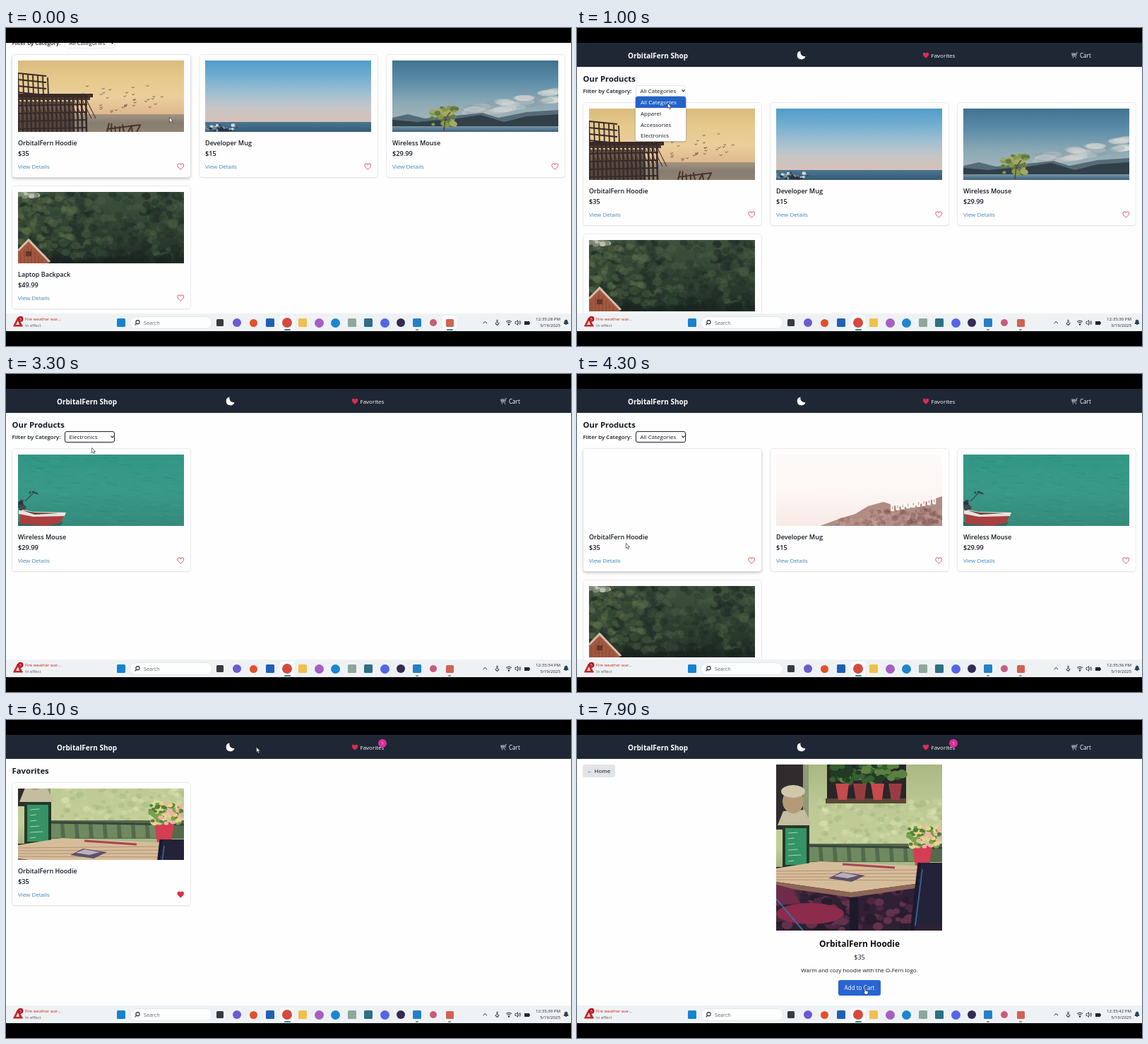
Recreate the animation shown at these times as an HTML page with a canvas. Size 800 by 450 pixels, loop 8000 ms.

```html
<!DOCTYPE html>
<html lang="en">
<head>
<meta charset="utf-8">
<title>Shop demo</title>
<style>
html, body { margin: 0; width: 100%; height: 100%; overflow: hidden; background: #000; }
body { font-family: 'Open Sans', 'Noto Sans', sans-serif; }
div, svg, canvas { position: absolute; }
svg { overflow: visible; }
.t { line-height: 20px; white-space: nowrap; }
#stage { left: 0; top: 0; width: 800px; height: 450px; overflow: hidden; background: #000; }
#view { top: 21px; width: 800px; height: 383px; overflow: hidden; background: #fefefe; }
#doc { top: -21px; width: 800px; height: 600px; }
#head { top: 21px; width: 800px; height: 33.5px; background: #1f2735; }
.card { width: 252.5px; height: 172.5px; border-radius: 4px; background: #fefefe;
  box-shadow: 0 0 0 .7px #e3e5e8, 0 1px 2px #0002; }
.card.hover { box-shadow: 0 0 0 .7px #dfe1e5, 0 2px 4px #0004; }
#select { left: 83px; top: 80.5px; width: 71px; height: 16.5px; box-sizing: border-box;
  border: .7px solid #e8e9ec; border-radius: 3px; background: #fefefe; }
#select.ring { border: 1.5px solid #1c2027; }
#menu { left: 83px; top: 97px; width: 71px; height: 62.5px; border-radius: 3px; background: #fefefe;
  box-shadow: 0 0 0 .7px #b9bdc4, 0 1px 3px #0004; overflow: hidden; }
.row { width: 71px; height: 15.6px; }
.row.on { background: #2463c8; }
.row.on .t { color: #fff !important; }
#link { top: 393px; height: 11px; background: #cfe1ea; border-radius: 0 2px 0 0; }
#bar { top: 404px; width: 800px; height: 25px; background: #eef2f4; }
</style>
</head>
<body>
<div id="stage"></div>
<script>
const LOOP = 8000, FRAME = 100, INK = '#151a26';
const HEART = 'M12 21C5 15.500 2 12 2 8a5 5 0 0 1 10-2 5 5 0 0 1 10 2c0 4-3 7.500-10 13z';

// ---------- element helpers ----------
function box(parent, props = {}, style = {}) {
  const el = Object.assign(document.createElement('div'), props);
  for (const k in style) el.style[k] = typeof style[k] === 'number' ? style[k] + 'px' : style[k];
  parent.append(el);
  return el;
}
// x is the left edge, or the centre/right edge when align says so; y is the middle of the capitals
function text(parent, str, x, y, size, color = INK, weight = 400, align = 0) {
  return box(parent, { className: 't', textContent: str }, {
    left: x, top: y - 10, fontSize: size, color, fontWeight: String(weight),
    transform: `translateX(${-align * 100}%)`
  });
}
function icon(parent, x, y, w, h, viewBox, body) {
  const holder = box(parent, {}, { left: x, top: y });
  holder.innerHTML = `<svg width="${w}" height="${h}" viewBox="${viewBox}">${body}</svg>`;
  return holder;
}
function canvas(parent, x, y, w, h) {
  const el = Object.assign(document.createElement('canvas'), { width: w, height: h });
  el.style.left = x + 'px';
  el.style.top = y + 'px';
  parent.append(el);
  return el;
}
const show = (el, on) => { el.style.display = on ? '' : 'none'; };

// ---------- photos ----------
function brush(c, seed) {
  const rnd = () => (seed = (seed * 16807) % 2147483647) / 2147483647;
  return {
    rnd,
    sky(y, h, ...stops) {
      const g = c.createLinearGradient(0, y, 0, y + h);
      stops.forEach((s, i) => g.addColorStop(i / (stops.length - 1), s));
      c.fillStyle = g;
      c.fillRect(0, y, 235, h);
    },
    rect(color, x, y, w, h) { c.fillStyle = color; c.fillRect(x, y, w, h); },
    poly(color, ...p) {
      c.fillStyle = color;
      c.beginPath();
      for (let i = 0; i < p.length; i += 2) c.lineTo(p[i], p[i + 1]);
      c.fill();
    },
    line(color, width, ...p) {
      c.strokeStyle = color;
      c.lineWidth = width;
      c.beginPath();
      for (let i = 0; i < p.length; i += 2) c.lineTo(p[i], p[i + 1]);
      c.stroke();
    },
    oval(color, x, y, rx, ry = rx) {
      c.fillStyle = color;
      c.beginPath();
      c.ellipse(x, y, rx, ry, 0, 0, 7);
      c.fill();
    },
    dabs(n, x, y, w, h, r, ...colors) {
      for (let i = 0; i < n; i++) {
        const s = r * (.4 + rnd() * .6);
        this.oval(colors[i % colors.length], x + rnd() * w, y + rnd() * h, s, s * .8);
      }
    }
  };
}

const paint = {
  pier(b) {
    b.sky(0, 77, '#d9bb7c', '#e6c98c', '#ebcf9b', '#dfb78f');
    b.sky(76, 25, '#a3947f', '#857d72', '#928370');
    const dark = '#372a29';
    for (let x = 0; x < 44; x += 7) b.line(dark, 1.8, x, 17 + x / 6, x + 1, 50);
    for (let y = 18; y < 48; y += 9) b.line(dark, 2, 0, y, 40, y + 4);
    b.rect(dark, 0, 47, 106, 5);
    b.rect('#4b3933', 0, 52, 102, 4);
    for (let x = 0; x < 102; x += 6) {
      b.line(dark, 2.6, x, 50, x + 1, 101);
      b.line('#463630', 1.1, x, 54, x + 14, 82);
    }
    b.rect('#3a2d2bb0', 0, 58, 78, 43);
    for (let y = 64; y < 101; y += 11) b.line(dark, 2, 0, y, 98, y - 2);
    for (let i = 0; i < 34; i++) {
      const x = 92 + b.rnd() * 112, y = 34 + b.rnd() * 40;
      b.line('#655444', .9, x - 2, y - 1, x, y, x + 2, y - 1.5);
    }
    for (let x = 126; x < 174; x += 6) b.line('#4a332c', 2, x, 101, x + 6 - b.rnd() * 10, 87 + b.rnd() * 6);
    b.line('#4a332c', 2, 126, 97, 174, 91);
  },
  sea(b) {
    b.sky(0, 88, '#519dcb', '#72adcf', '#9bbfd1', '#c5c6c7', '#d8c1b7');
    b.sky(87, 14, '#4a7590', '#365b76');
    b.dabs(26, 0, 91, 46, 8, 3, '#cfd8dc', '#71889a', '#303d4b');
    b.dabs(12, 6, 96, 34, 5, 3, '#2b3440');
  },
  lake(b) {
    b.sky(0, 90, '#41738f', '#5d8da8', '#8caab5', '#a7b6b9');
    for (let i = 0; i < 44; i++) {
      const u = b.rnd();
      b.oval(['#c9cfd060', '#e0dfda70', '#8b9ca460'][i % 3], 110 + u * 125, 67 - u * 25 + b.rnd() * 14, 14, 4);
    }
    b.poly('#566b78', 0, 81, 22, 76, 46, 82, 90, 78, 128, 74, 150, 81, 190, 73, 235, 70, 235, 96, 0, 96);
    b.poly('#303f48', 0, 84, 35, 87, 92, 82, 125, 77, 158, 87, 190, 79, 235, 76, 235, 95, 0, 95);
    b.sky(93, 8, '#7895a5', '#3e617e');
    b.line('#55513c', 2, 73, 98, 75, 76);
    b.dabs(54, 55, 66, 36, 26, 5, '#87984b', '#617943', '#a3ab61');
    b.line('#55513c', 1.5, 73, 101, 75, 82, 82, 73);
  },
  trees(b) {
    b.sky(0, 101, '#3f5140', '#304232', '#202c25');
    b.dabs(420, 0, 0, 235, 92, 8, '#38503970', '#4c604470', '#26372b80', '#1f2c2590');
    b.dabs(90, 0, 10, 82, 66, 7, '#5b6c4860', '#6f7b5050', '#314431a0');
    b.dabs(24, 0, 0, 32, 6, 5, '#b9bfb0', '#7e8b72');
    b.dabs(26, 40, 88, 195, 13, 12, '#1b241f90');
    b.poly('#a2583f', 0, 83, 15, 68, 43, 98, 43, 101, 0, 101);
    for (let x = 4; x < 38; x += 5) b.line('#82432f', .8, x, 101, x, 76 + Math.abs(x - 15));
    b.line('#d8bca9', 3, 0, 83, 15, 68, 45, 99);
    b.rect('#61372d', 11, 84, 8, 7);
  },
  hill(b) {
    b.sky(0, 101, '#fcfaf9', '#fcf7f5', '#f8ebe7');
    b.poly('#b18c85', 62, 101, 92, 90, 112, 84, 130, 73, 152, 67, 170, 73, 192, 75, 214, 66, 235, 59, 235, 101);
    b.dabs(140, 128, 78, 107, 22, 5, '#9b706a80', '#76524f70', '#c39c9280');
    b.dabs(36, 82, 90, 60, 10, 4, '#9b706a80', '#c6a29a80');
    for (let i = 0; i < 9; i++) {
      b.rect('#fbf6f2', 162 + i * 7.4, 70 - i * 1.2, 5, 10);
      b.rect('#c3a09a', 164 + i * 7.4, 73 - i * 1.2, 1.2, 4);
    }
  },
  boat(b) {
    b.sky(0, 101, '#329684', '#399987', '#348a7b');
    for (let i = 0; i < 210; i++) {
      const x = b.rnd() * 235, y = b.rnd() * 101;
      b.line(['#58ab9738', '#20796b45'][i % 2], 1, x, y, x + 6 + b.rnd() * 10, y + 1);
    }
    b.poly('#246b62', 0, 95, 64, 95, 60, 101, 0, 101);
    b.poly('#a9403f', 2, 80, 20, 84, 67, 84, 60, 97, 40, 101, 3, 98);
    b.poly('#ece3dc', 1, 77, 22, 81, 68, 82, 66, 87, 22, 88, 1, 84);
    b.poly('#67453f', 6, 79, 24, 82, 58, 83, 24, 85);
    b.dabs(14, 0, 65, 9, 12, 4, '#28383c', '#414a4c');
    b.line('#34494a', 1.2, 10, 66, 22, 54, 29, 56);
    b.dabs(7, 16, 51, 14, 6, 2, '#34494a');
  },
  cafe(b) {
    b.sky(0, 235, '#a9b883', '#bdc994', '#c3cd98', '#82976f', '#322637');
    b.dabs(160, 60, 48, 175, 65, 6, '#dce3b470', '#9eb17d60', '#c8d69d60');
    b.rect('#302b2d', 0, 0, 42, 92);
    b.rect('#8c9a76', 38, 0, 8, 112);
    b.rect('#292528', 72, 0, 112, 51);
    b.rect('#5a4636', 70, 48, 114, 7);
    b.dabs(80, 72, 0, 108, 25, 8, '#365f2e', '#5b8141', '#203b25');
    for (let i = 0; i < 4; i++) b.poly(i % 2 ? '#973d42' : '#c74a4d',
      84 + i * 25, 27, 103 + i * 25, 27, 100 + i * 25, 50, 88 + i * 25, 50);
    b.poly('#c4bda0', 2, 86, 10, 66, 40, 64, 51, 86);
    b.oval('#b59a78', 24, 52, 15, 17);
    b.oval('#d0c8aa', 24, 38, 17, 9);
    b.rect('#546a4b', 42, 112, 193, 26);
    for (let x = 45; x < 188; x += 20) b.poly('#6f8961', x, 115, x + 15, 116, x + 16, 137, x + 2, 137);
    b.line('#36463b', 3, 42, 115, 235, 118);
    b.rect('#302034', 0, 145, 235, 90);
    b.dabs(90, 0, 178, 190, 56, 9, '#4b2840', '#271d2d', '#63314a');
    b.rect('#263828', 9, 86, 38, 60);
    b.rect('#359366', 13, 90, 30, 52);
    for (let y = 97; y < 140; y += 8) b.line('#a7d8a7', 1.2, 17, y, 25 + b.rnd() * 13, y - 1);
    b.poly('#d6bd99', 0, 147, 62, 137, 232, 145, 204, 168, 106, 181, 0, 166);
    b.poly('#8c6557', 0, 166, 106, 181, 204, 168, 204, 174, 106, 188, 0, 173);
    for (let i = 0; i < 4; i++) b.line('#b48f76', 1, 0, 151 + i * 4, 210, 149 + i * 5);
    b.poly('#5d506a', 74, 161, 92, 152, 126, 157, 107, 166);
    b.poly('#b9b0bb', 82, 158, 94, 153, 116, 157, 101, 161);
    b.line('#a64553', 3, 94, 141, 168, 146);
    b.poly('#d43e52', 193, 116, 221, 116, 217, 143, 197, 143);
    b.dabs(100, 187, 88, 44, 28, 5, '#78a34b', '#e6d58a', '#4d813c', '#ecb5a2');
    b.oval('#8c2b4c', 48, 211, 48, 15);
    b.poly('#6e2c48', 0, 170, 24, 176, 34, 196, 0, 200);
    b.poly('#242239', 205, 139, 235, 139, 235, 228, 196, 228);
    b.line('#191a30', 5, 203, 139, 192, 235);
    b.line('#3978a8', 1.4, 207, 148, 197, 228);
    b.line('#386e9b', 2, 0, 190, 38, 235);
    b.rect('#1d192a', 104, 188, 12, 47);
  }
};
const photos = {};
Object.keys(paint).forEach((name, i) => {
  const pic = Object.assign(document.createElement('canvas'), { width: 235, height: name === 'cafe' ? 235 : 101 });
  paint[name](brush(pic.getContext('2d'), 71 + i * 913));
  photos[name] = pic;
});
function hang(target, name) {
  if (target.dataset.name === name) return;
  target.dataset.name = name;
  const c = target.getContext('2d'), pic = photos[name];
  c.clearRect(0, 0, 235, 235);
  if (pic) c.drawImage(pic, 0, Math.round((target.height - pic.height) / 2));
}

// ---------- page ----------
const stage = document.getElementById('stage');
const view = box(stage, { id: 'view' });
const doc = box(view, { id: 'doc' });
const head = box(doc, { id: 'head' });
text(head, 'OrbitalFern Shop', 72, 17.5, 10, '#fff', 700);
icon(head, 312, 11, 12, 12, '0 0 12 12', '<path d="M4.500 .5A6 6 0 1 0 11.500 8 6 6 0 0 1 4.500 .5z" fill="#fff"/>');
icon(head, 488.5, 12.5, 10, 10, '0 0 24 24', `<path d="${HEART}" fill="#df2b53"/>`);
text(head, 'Favorites', 501.5, 17.5, 8, '#fff');
icon(head, 700, 13, 9, 9, '0 0 9 9',
  '<path d="M9 .5H7.800L6.500 6H1.500L.5 2H7M1 3.500H7M2.500 2V6M4.500 2V6" fill="none" stroke="#b9c0c6" stroke-width=".8"/><path d="M2 8h1M6 8h1" stroke="#b9c0c6" stroke-width="1.400"/>');
text(head, 'Cart', 712, 17.5, 8.1, '#fff');
const badge = box(head, {}, { left: 527, top: 6, width: 12, height: 12, borderRadius: 6, background: '#d92f98' });
text(badge, '1', 6, 6, 6, '#fff', 400, .5);

const heading = text(doc, '', 8.5, 72, 11.3, INK, 700);
const filter = box(doc);
text(filter, 'Filter by Category:', 8.5, 89, 7.9, INK, 600);
const select = box(filter, { id: 'select' });
const chosen = text(filter, '', 89.5, 89, 8);
icon(filter, 147.5, 87, 5, 4, '0 0 5 4', '<path d="M.5 .5 2.500 2.800 4.500 .5" fill="none" stroke="#151a26" stroke-width="1.100"/>');

const products = [['OrbitalFern Hoodie', '$35'], ['Developer Mug', '$15'], ['Wireless Mouse', '$29.99'], ['Laptop Backpack', '$49.99']];
const cards = products.map(([name, price]) => {
  const el = box(doc, { className: 'card' });
  const photo = canvas(el, 8.5, 8, 235, 101);
  text(el, name, 8.5, 125, 9.05, INK, 600);
  text(el, price, 8.5, 139.8, 9.2, INK, 600);
  text(el, 'View Details', 8.5, 158, 8, '#4183b8');
  const heart = icon(el, 233, 153, 10.5, 10.5, '0 0 24 24', `<path d="${HEART}" stroke="#d6444e" stroke-width="2"/>`);
  return { el, photo, heart: heart.querySelector('path') };
});

const menu = box(doc, { id: 'menu' });
const rows = ['All Categories', 'Apparel', 'Accessories', 'Electronics'].map((name, i) => {
  const row = box(menu, { className: 'row' }, { top: i * 15.6 });
  text(row, name, 7, 8.3, 8);
  return row;
});

const detail = box(doc);
const home = box(detail, {}, { left: 8, top: 63, width: 46, height: 17.5, borderRadius: 3, background: '#e2e4e8' });
text(home, '← Home', 23, 9, 7.9, '#374151', 600, .5);
const bigPhoto = canvas(detail, 282, 63, 235, 235);
text(detail, products[0][0], 400, 316, 11.9, '#0b0d12', 700, .5);
text(detail, '$35', 400, 336, 9.1, INK, 400, .5);
text(detail, 'Warm and cozy hoodie with the O-Fern logo.', 400, 353.5, 8, INK, 400, .5);
const add = box(detail, {}, { left: 370, top: 368, width: 60, height: 21.5, borderRadius: 3, background: '#2864d2' });
text(add, 'Add to Cart', 30, 11, 8.1, '#fff', 400, .5);

const link = box(stage, { id: 'link' });
const linkText = text(link, '', 2, 5.5, 6.1, '#3a4a55');

// ---------- taskbar ----------
const bar = box(stage, { id: 'bar' });
icon(bar, 10, 4, 15, 15, '0 0 15 15',
  '<path d="M6.500 2 13.500 14H.5z" fill="#c3272b" stroke="#c3272b" stroke-linejoin="round"/><path d="M7 6 9 12H4z" fill="#f7dcd6"/><circle cx="10.500" cy="3.800" r="4" fill="#b3161f"/>');
text(bar, '5', 20.5, 7.8, 5, '#fff', 400, .5);
text(bar, 'Fire weather war...', 27, 8, 5.95, '#c42b1c');
text(bar, 'In effect', 27, 17, 6, '#5c6166');
box(bar, {}, { left: 176, top: 5, width: 115, height: 16, borderRadius: 8, background: '#fdfefe', boxShadow: '0 0 0 .5px #d8dde0' });
icon(bar, 182, 9, 8, 8, '0 0 8 8', '<g fill="none" stroke="#24292d" stroke-width="1.100"><circle cx="4.500" cy="3.200" r="2.600"/><path d="M2.600 5.200.5 7.500"/></g>');
text(bar, 'Search', 195, 13, 7.2, '#62686d');
const tile = x => box(bar, {}, { left: x - 10, top: 3, width: 20, height: 20, borderRadius: 3, background: '#fbfdfd' });
const dash = (x, w, color) => box(bar, {}, { left: x - w / 2, top: 22, width: w, height: 1.6, borderRadius: 1, background: color });
tile(398);
const snipTile = tile(628);
[[163, '#1683d0'], [303, '#383a3d', 10], [327, '#6a5bd0', 12, 1], [350.5, '#e2502b', 11, 1], [374, '#1f5fb5'],
 [398, '#d6493c', 14, 1], [420, '#f0c04c'], [443, '#a65fc0', 13, 1], [466, '#1c86cf', 13, 1], [489.5, '#8ea69b'],
 [512.5, '#2d6f86'], [536, '#5664e8', 13, 1], [559, '#332a55', 12, 1], [582, '#2480c8'], [605, '#c85b78', 10, 1],
 [628, '#d36250', 11]].forEach(([x, color, size = 12, round]) => box(bar, {}, {
  left: x - size / 2, top: 13 - size / 2, width: size, height: size, background: color, borderRadius: round ? '50%' : '1.5px'
}));
dash(398, 9, '#2b8a94');
dash(582, 4, '#858b90');
const snipDash = dash(628, 4, '#858b90');
const snipActive = dash(628, 9, '#2b8a94');
icon(bar, 675, 7, 70, 12, '0 0 70 12',
  `<g fill="none" stroke="#22272b" stroke-width="1"><path d="M.5 7 3.300 4.500 6 7M18 6a2 2.500 0 0 0 5 0M20.500 8.500V10"/>
  <path d="M33 4.500q4-3 8 0M34.500 6.300q2.500-2 5 0"/><path d="M46 4.500h1.500L49.500 2.500v7L47.500 7.500H46zM51 4q1.500 2 0 4M52.500 3q2.500 3 0 6" stroke-width=".8"/></g>
  <rect x="19.300" y="1.500" width="2.400" height="5.500" rx="1.200" fill="#707579"/><circle cx="37" cy="8.500" r="1.200" fill="#22272b"/>
  <path d="M59 4h7v5h-7z" fill="#22272b"/><path d="M66.500 5.500v2" stroke="#22272b"/>`);
const clock = text(bar, '', 785, 8, 6.1, '#24292d', 400, 1);
text(bar, '5/19/2025', 785, 17, 6.1, '#24292d', 400, 1);
icon(bar, 789, 8, 8, 9, '0 0 8 9', '<path d="M1 6.500V6Q2 5 2 3.500a2 2.500 0 0 1 4 0Q6 5 7 6v.5zM3 7.500h2" fill="#2a4356" stroke="#2a4356"/>');

// ---------- pointer ----------
const pointer = box(stage);
const arrow = icon(pointer, 0, 0, 7, 10, '0 0 7 10',
  '<path d="M.4.400V7.600L2 6.100 3.200 8.900 4.500 8.300 3.300 5.700H5.700z" fill="#fff" stroke="#33373c" stroke-width=".7"/>');
const spinner = icon(pointer, 3, -2, 7, 7, '0 0 7 7',
  '<circle cx="3.500" cy="3.500" r="2.300" fill="#9fd0ee" stroke="#1d7cc4" stroke-width="1.700"/>');
const hand = icon(pointer, -2, 0, 8, 10, '0 0 8 10',
  '<path d="M2 5.500V1.200q.8-1.200 1.600 0V4L6.800 4.800Q7.500 5.200 7.200 6.500L6.500 9.300H3.200L.6 6.300Q.7 5 2 6.300z" fill="#fff" stroke="#22262b" stroke-width=".7"/>');

// ---------- timeline ----------
const ALL = [0, 1, 2, 3], AT = 'localhost:3000';
const steps = [
  [0, { page: 'shop', items: ALL, pics: ['pier', 'sea', 'lake', 'trees'], pick: 'All Categories', open: -1, ring: false, fav: false, url: '', cur: '', big: '' }],
  [800, { open: 0 }],
  [1100, { open: 1 }],
  [1300, { open: -1, pick: 'Apparel', items: [0], ring: true }],
  [1700, { open: 1 }],
  [1800, { open: 2 }],
  [2000, { open: -1, pick: 'Accessories', items: [1, 3], pics: [], cur: 'busy' }],
  [2500, { pics: ['', 'hill', '', 'trees'], cur: '' }],
  [2700, { open: 2 }],
  [2800, { open: 3 }],
  [3000, { open: -1, pick: 'Electronics', items: [2], pics: [], cur: 'busy' }],
  [3300, { pics: ['', '', 'boat'], cur: '' }],
  [3500, { open: 3 }],
  [3600, { open: 0 }],
  [3800, { open: -1, pick: 'All Categories', items: ALL }],
  [4100, { pics: ['', 'hill', 'boat', 'trees'] }],
  [4500, { pics: ['cafe', 'hill', 'boat', 'trees'] }],
  [4700, { cur: 'hand' }],
  [4800, { fav: true, ring: false }],
  [5100, { cur: '' }],
  [5700, { url: AT + '/favorites', cur: 'hand' }],
  [5900, { page: 'favorites', items: [0] }],
  [6100, { url: '', cur: '' }],
  [6400, { url: AT, cur: 'hand' }],
  [6600, { page: 'shop', items: [], cur: 'busy' }],
  [7100, { items: ALL, url: '', cur: '' }],
  [7300, { url: AT + '/product/1', cur: 'hand' }],
  [7500, { page: 'detail', items: [], url: '', cur: '' }],
  [7600, { big: 'cafe' }],
  [7800, { cur: 'hand' }]
];
const path = [
  [0, 231, 126], [400, 231, 126], [700, 118, 88], [800, 118, 90], [1000, 128, 106], [1200, 122, 121], [1300, 122, 121],
  [1600, 124, 88], [1700, 122, 116], [1900, 118, 137], [2000, 118, 137], [2300, 124, 88], [2600, 124, 88],
  [2900, 112, 152], [3000, 112, 152], [3400, 124, 88], [3600, 116, 105], [3800, 116, 105], [4300, 69, 239],
  [4700, 245, 263], [5000, 245, 263], [5400, 413, 107], [5700, 515, 38], [5900, 515, 38], [6400, 113, 38],
  [6600, 113, 38], [6900, 93, 127], [7300, 40, 264], [7500, 40, 264], [7800, 400, 376], [7900, 407, 379]
];
function along(t) {
  const i = path.findIndex(p => p[0] > t);
  if (i < 0) return path[path.length - 1].slice(1);
  const [a, b] = [path[i - 1], path[i]];
  const u = (t - a[0]) / (b[0] - a[0]);
  return [a[1] + (b[1] - a[1]) * u, a[2] + (b[2] - a[2]) * u];
}

function draw(t) {
  const s = Object.assign({}, ...steps.filter(([at]) => at <= t).map(step => step[1]));
  const scroll = 68 * (1 - Math.min(1, Math.max(0, (t - 100) / 300)));
  const [x, y] = along(t);
  const shop = s.page === 'shop';

  doc.style.transform = `translateY(${-scroll}px)`;
  heading.textContent = shop ? 'Our Products' : 'Favorites';
  show(heading, s.page !== 'detail');
  show(filter, shop);
  show(detail, s.page === 'detail');
  show(badge, s.fav);
  chosen.textContent = s.pick;
  select.className = s.ring ? 'ring' : '';
  show(menu, s.open >= 0);
  rows.forEach((row, i) => row.classList.toggle('on', i === s.open));
  hang(bigPhoto, s.big);

  cards.forEach((card, i) => {
    const slot = s.items.indexOf(i);
    show(card.el, slot >= 0);
    if (slot < 0) return;
    const left = 8.5 + slot % 3 * 265, top = (shop ? 106 : 89) + Math.floor(slot / 3) * 186;
    card.el.style.left = left + 'px';
    card.el.style.top = top + 'px';
    const dx = x - left, dy = y + scroll - top;
    card.el.classList.toggle('hover', s.open < 0 && dx > 0 && dx < 252 && dy > 0 && dy < 172);
    card.heart.setAttribute('fill', s.fav && i === 0 ? '#d92c3e' : 'none');
    hang(card.photo, s.pics[i] || '');
  });

  show(link, s.url);
  linkText.textContent = s.url;
  link.style.width = s.url.length * 3 + 3.5 + 'px';

  const active = t < 300;
  show(snipTile, active);
  show(snipActive, active);
  show(snipDash, !active);
  clock.textContent = `12:35:${Math.floor(28.2 + t * .00186)} PM`;

  pointer.style.transform = `translate(${x}px, ${y}px)`;
  show(arrow, s.cur !== 'hand');
  show(spinner, s.cur === 'busy');
  show(hand, s.cur === 'hand');
}

const start = performance.now();
function tick() {
  const t = (performance.now() - start) % LOOP;
  draw(Math.floor(t / FRAME) * FRAME);
  requestAnimationFrame(tick);
}
tick();
</script>
</body>
</html>
```
